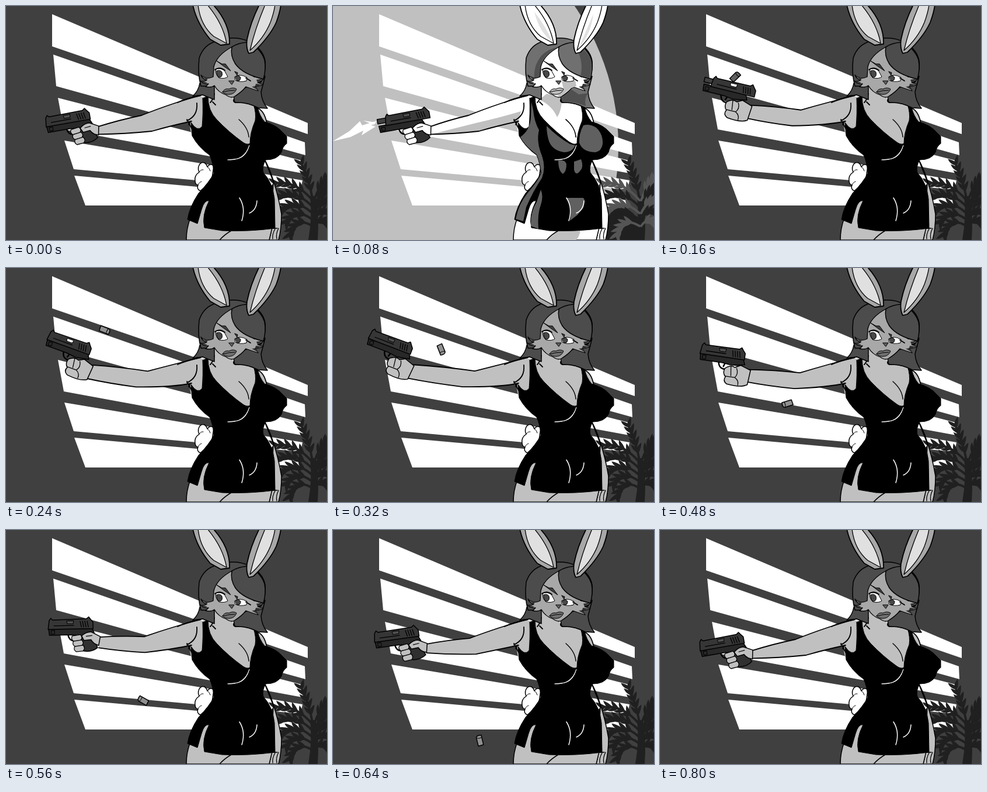
Recreate the animation shown at these times as an HTML page with a canvas. Size 550 by 400 pixels, loop 1960 ms.

```html
<!DOCTYPE html>
<html>
<head>
<meta charset="utf-8">
<style>
html, body { margin: 0; overflow: hidden; background: #404040; }
canvas { display: block; }
</style>
</head>
<body>
<canvas id="stage" width="550" height="400"></canvas>
<script>
const ctx = document.getElementById('stage').getContext('2d');
ctx.lineJoin = ctx.lineCap = 'round';
const STEP = 80, LOOP = 1960;
const mix = (a, b, k) => a + (b - a) * k;
const rad = deg => deg * Math.PI / 180;

function shape(d, fill, line, width = 1.5) {
  const p = new Path2D(d);
  if (fill) { ctx.fillStyle = fill; ctx.fill(p); }
  if (line) { ctx.strokeStyle = line; ctx.lineWidth = width; ctx.stroke(p); }
}
const ink = (d, width) => shape(d, null, '#000', width);

function at(x, y, deg, draw) {
  ctx.save();
  ctx.translate(x, y);
  ctx.rotate(rad(deg));
  draw();
  ctx.restore();
}

// The shot throws the gun up quickly, then it eases back down.
function poseAt(step) {
  const rise = Math.max(0, 1 - 0.16 ** (step - 1));
  const fall = Math.min(1, Math.max(0, (step - 4) / 5.5));
  const lift = rise * (1 + Math.cos(Math.PI * fall)) / 2;
  const push = step > 0 && step < 4 ? 9 : 0;
  return {
    lift,
    x: 66 + push + 6 * Math.sin(Math.PI * lift),
    y: 191 - 86 * lift,
    deg: -10 + 31 * lift ** 1.5
  };
}

function frond(x0, y0, cx, cy, x1, y1, color) {
  shape(`M${x0} ${y0}Q${cx} ${cy} ${x1} ${y1}`, null, color, 4);
  for (let t = 0.3; t <= 1; t += 0.17) {
    const u = 1 - t;
    const x = u * u * x0 + 2 * u * t * cx + t * t * x1;
    const y = u * u * y0 + 2 * u * t * cy + t * t * y1;
    const dir = Math.atan2(u * (cy - y0) + t * (y1 - cy), u * (cx - x0) + t * (x1 - cx));
    for (const side of [-35, 35])
      at(x, y, dir * 180 / Math.PI + side, () => shape('M-2 -2Q8 -5 16 1Q8 4 -2 3Z', color));
  }
}

function background(flash) {
  shape('M0 0H550V400H0Z', '#404040');
  if (flash) shape('M-353 240a421 421 0 1 0 842 0a421 421 0 1 0 -842 0Z', '#c0c0c0');
  shape('M79 14L517 200V219L79 69ZM81 83L512 233L513 255L86 137Z' +
    'M89 157L510 265L508 286L99 211ZM100 230L508 298L505 314L116 279Z' +
    'M117 290L505 325V341H136Z', '#fff');
}

function plant(flash) {
  const dark = '#202020';
  shape('M521 325H531Q537 360 534 400H518Q525 360 521 325Z', dark);
  if (flash) shape('M465 345Q495 335 515 355Q530 375 528 400H469Z', dark);
  frond(526, 334, 520, 298, 506, 269, dark);
  for (let k = 0; k < 5; k++) {
    const base = 332 + k * 11, bend = 298 + k * 15, tip = 290 + k * 22;
    const color = flash && k % 2 === 0 ? '#555' : dark;
    frond(525, base, 496, bend, 462 + k * 6, tip + 13, color);
    frond(528, base, 540, bend, 556, tip, color);
  }
}

function arm(c, pose, flash) {
  const { lift, x, y, deg } = pose, cos = Math.cos(rad(deg)), sin = Math.sin(rad(deg));
  const wrist = (px, py) => [x + px * cos - py * sin, y + px * sin + py * cos];
  const [wx, wy] = wrist(87, 31), [vx, vy] = wrist(86, 44 + 12 * lift);
  const ex = mix(232, 243, lift), ey = mix(187, 176, lift);
  const fx = mix(250, 222, lift), fy = mix(214, 203, lift);
  const top = `M334 153Q290 164 ${ex} ${ey}Q${(ex + wx) / 2} ${(ey + wy) / 2 - 2} ${wx} ${wy}`;
  const low = `${vx} ${vy}Q${(vx + fx) / 2} ${(vy + fy) / 2 + 2} ${fx} ${fy}Q285 204 318 197`;
  shape(`${top}L${low}L340 190Z`, c.skin);
  if (flash) shape(`M${low}L322 180Q285 191 245 200L${vx} ${vy}Z`, '#c0c0c0');
  ink(`${top}M${low}`, 1.8);
  ink('M333 153Q309 158 294 165M327 166Q329 188 310 196M316 197L313 203M310 194L318 209', 1.8);
}

function body(c, pose, flash) {
  // tail
  shape('M356 274Q351 267 345 275Q341 264 333 269Q327 276 331 284Q322 290 324 300Q325 306 329 306Q326 313 333 316L352 300Z',
    '#fff', '#000');
  ink('M345 275Q349 277 350 282M331 284Q334 279 338 280M329 306Q331 301 335 300', 1);
  // hanging arm and legs
  shape('M442 260Q451 276 457 295Q467 325 472 356Q472 381 467 400H451L455 379L458 300Z', c.skin, '#000');
  ink('M455 380Q454 390 451 399M461 381Q456 390 457 398M467 380Q462 390 464 398M458 380H465', 1.3);
  shape('M335 330L316 362Q309 380 309 400H451L457 375L400 330Z', c.skin, '#000');
  if (flash) shape('M386 383L424 383Q423 392 417 400H366Q378 392 386 383Z', '#c0c0c0');
  ink('M386 384Q374 391 366 400');
  // torso
  shape('M328 155L356 154Q357 148 357 138L391 145Q386 158 391 164Q412 165 428 171Q443 177 448 205L455 215L418 244L350 230L318 218Q313 207 317 197Z',
    c.skin);
  if (flash) shape('M354 160L366 150L390 155L392 165Q390 182 384 190Q376 171 354 160Z', '#c0c0c0');
  ink('M357 150Q355 160 350 165M391 158Q388 164 393 165Q418 164 432 175Q444 180 448 206M354 164L359 169', 1.8);
  ink('M399 194Q415 208 416 224', 1.4);
  arm(c, pose, flash);
}

function dress(flash) {
  shape('M337 158L346 154Q346 179 361 194Q382 216 406 233Q413 238 418 235Q418 217 427 196Q429 183 424 168L431 173Q434 187 443 198' +
    'Q463 203 474 216L481 223V235Q474 240 472 250Q465 263 445 263Q438 275 441 285Q457 302 460 330L461 380' +
    'Q415 386 370 384L340 379Q335 358 348 333Q340 331 335 348L328 372L311 365Q314 344 330 320Q349 300 356 286' +
    'Q355 268 349 255Q330 242 319 222L317 199Q328 216 336 206Q338 185 337 158Z', '#000', '#000', 1);
  if (flash) {
    const g = '#606060';
    shape('M340 164L343 178Q345 198 353 212Q348 232 358 256Q365 276 358 294Q343 316 331 344L326 368L313 364Q318 338 334 319' +
      'Q353 297 357 285Q354 264 349 254Q328 238 321 224Q338 212 339 190Z', g);
    shape('M339 376Q338 352 349 335L356 314Q361 325 356 340Q350 355 352 381Z', g);
    shape('M366 205Q385 224 406 236L415 238Q410 250 396 250Q376 247 370 231Q366 218 366 205Z', g);
    shape('M429 204Q440 201 451 208Q463 219 462 236Q460 248 450 250Q428 250 422 234Q421 218 429 204Z', g);
    shape('M386 264Q397 262 400 270Q400 283 394 287Q386 282 386 264ZM413 266L425 262Q430 275 424 281Q416 292 413 280Z', g);
    shape('M399 328H429Q433 332 429 345L419 357L406 367Q410 343 399 328Z', g);
    // upper curve of the chest
    shape('M377 207Q382 195 397 195Q414 204 416 222L414 235L405 232Q390 221 377 207Z', '#fff');
    ink('M399 194Q415 208 416 224', 1.4);
  }
  shape('M380 263Q408 265 417 238Q412 257 398 261Z', '#fff', '#fff', 0.8);
  shape('M400 328Q411 345 404 367M430 333Q429 349 417 354', null, '#fff', 1.5);
}

function head(c, flash) {
  // long hair behind the neck
  shape('M332 132Q330 145 320 154L337 152L357 160V130Z', c.hair, '#000');
  shape('M390 153Q391 164 393 165Q414 164 432 174L448 175Q438 163 437 147L444 120L412 136Z', c.hair, '#000');
  if (flash) shape('M391 156L409 143L421 151L437 149Q430 158 433 171Q411 162 393 164Z', c.hairShade);
  // skull and face
  shape('M334 137Q328 116 331 89Q339 65 362 60Q388 50 412 59Q440 71 444 94Q446 112 437 130L409 140L352 137Z', c.hair, '#000');
  if (flash) shape('M386 70Q361 81 355 104L356 122L346 130Q341 105 357 85Q369 73 386 70Z', c.hairShade);
  shape('M387 70Q361 84 356 104L355 121Q343 127 334 118Q336 124 344 127Q338 130 333 128Q339 134 347 133L342 138Q352 140 357 136' +
    'Q364 148 377 152Q385 158 391 155Q404 147 411 138Q422 142 432 145L427 137Q437 137 441 134L431 131Q440 128 442 123L425 121L393 98Z', c.face, '#000', 1.3);
  shape('M334 118L346 123L344 127ZM333 128L345 131L341 133ZM441 124L429 126L431 131ZM441 134L428 133L427 137ZM432 144L421 138L427 137Z', '#303030');
  if (flash) shape('M392 129L415 127L417 137L407 141Q397 150 389 155L384 153Q397 147 394 138Z', '#c0c0c0');
  // eyes
  shape('M359 108Q366 105 374 110L380 121Q375 125 365 123Q359 118 359 108Z', '#fff', '#000', 1);
  shape('M361 111Q366 108 370 113Q372 122 365 122Q360 118 361 111Z', '#484848', '#000', 1);
  shape('M392 121Q400 115 413 122L412 128Q401 131 393 127Z', '#fff', '#000', 1);
  shape('M393 121Q398 117 402 122Q402 129 396 128Z', '#484848', '#000', 1);
  ink('M358 109Q366 103 375 110M411 123L419 128', 1.8);
  shape('M361 94L370 99L376 99L385 111L373 103ZM392 112L397 114L396 118Z', '#404040', '#000', 1);
  // nose and mouth
  shape('M382 128L391 128L387 134Z', '#606060', '#000', 1);
  shape('M371 147Q375 140 382 142Q389 138 395 142Q392 150 384 151Q376 152 371 147Z', c.lips, '#000', 1);
  ink('M372 147Q382 144 392 144', 1);
  // fringe
  shape('M387 70Q384 85 393 99Q406 117 441 125Q446 108 443 92Q436 71 413 62Q398 63 387 70Z', c.hair, '#000');
  if (flash) shape('M412 65Q434 73 442 92Q444 109 440 123L424 120Q431 91 412 65Z', c.hairShade);
  // ears
  shape('M320 -2Q327 30 350 57L368 67L383 65Q384 30 355 -2Z', c.ear, '#000', 1.8);
  shape('M329 -2Q333 33 356 52L378 64Q372 30 345 -2Z', c.earIn, '#000', 1.3);
  shape('M434 -2Q419 28 413 57Q411 72 416 81L424 79Q452 52 463 28Q469 12 471 -2Z', c.ear, '#000', 1.8);
  shape('M444 -2Q427 38 418 76Q442 55 453 28Q459 12 461 -2Z', c.earIn, '#000', 1.3);
  if (flash) shape('M345 10Q365 35 375 60Q354 46 345 10ZM446 14Q432 46 422 70Q442 48 446 14Z', '#e0e0e0');
}

function casing(x, y, deg, color) {
  at(x, y, deg, () => {
    shape('M-9 -4L6 -5Q10 -4 9 4L-8 5Z', color, '#000');
    ink('M5 -4Q3 0 5 4', 1);
  });
}

function gun(c, step, raised) {
  const open = step === 1 || step === 2, port = step === 2 || step === 3;
  if (!raised) shape('M54 24L74 20L84 49Q72 58 56 53Z', '#303030', '#000');
  ink('M34 26Q36 39 51 36M45 26L43 32', 2.5);
  shape('M1 15L75 15L79 24L56 28L40 26L2 26Z', '#282828', '#000');
  if (open) shape('M0 3H16V11H0Z', '#404040', '#000');
  ctx.save();
  ctx.translate(open ? 13 : 0, 0);
  shape('M2 1L5 -3L8 0L66 -1L70 -4L73 0L77 5V16H0Z', '#363636', '#000');
  for (let x = 55; x < 68; x += 4) ink(`M${x} 3L${x + 2} 13`, 1.3);
  ink('M10 10H44', 1.3);
  shape('M32 2L44 2L43 7L33 7Z', port ? '#fff' : '#505050', '#000', 1);
  ctx.restore();
  ink('M5 18H11V24H5Z', 1);
  if (raised) {
    shape('M46 35Q55 27 63 31L72 26L90 32L88 57Q78 64 53 61Q45 57 49 49Q43 44 46 35Z', c.skin, '#000');
    ink('M49 48L65 48Q71 41 66 32M65 48Q73 52 72 60M56 31L58 46', 1.3);
  } else {
    for (let i = 0; i < 3; i++)
      at(41 + i * 2, 28 + i * 9, 0, () => shape('M0 0L14 -2Q19 3 14 8L2 9Q-3 5 0 0Z', c.skin, '#000', 1.3));
    shape('M57 28Q66 21 74 22L89 30L86 45Q77 43 73 35L61 36Z', c.skin, '#000');
    ink('M65 29L75 28', 1.2);
  }
  if (step === 2) casing(50, -10, -55, '#606060');
}

function draw(step) {
  const flash = step === 1, pose = poseAt(step);
  const c = flash
    ? { skin: '#fff', face: '#fff', ear: '#fff', earIn: '#fff', lips: '#c0c0c0', hair: '#707070', hairShade: '#505050' }
    : { skin: '#c0c0c0', face: '#a8a8a8', ear: '#a8a8a8', earIn: '#e0e0e0', lips: '#707070', hair: '#4c4c4c' };
  background(flash);
  plant(flash);
  body(c, pose, flash);
  dress(flash);
  head(c, flash);
  if (flash) shape('M0 231L28 214L46 197L50 204L76 196L66 204L73 206L49 221L52 213L30 224ZM52 196L74 199L70 203Z', '#fff');
  at(pose.x, pose.y, pose.deg, () => gun(c, step, pose.lift > 0.6));
  const n = step - 3;
  if (n >= 0) casing(169 + 16.5 * n, 106 + 28.8 * n + 4.4 * n * n, 25 + 47 * n, '#909090');
}

function tick() {
  draw(Math.floor(performance.now() % LOOP / STEP));
  requestAnimationFrame(tick);
}
tick();
</script>
</body>
</html>
```
